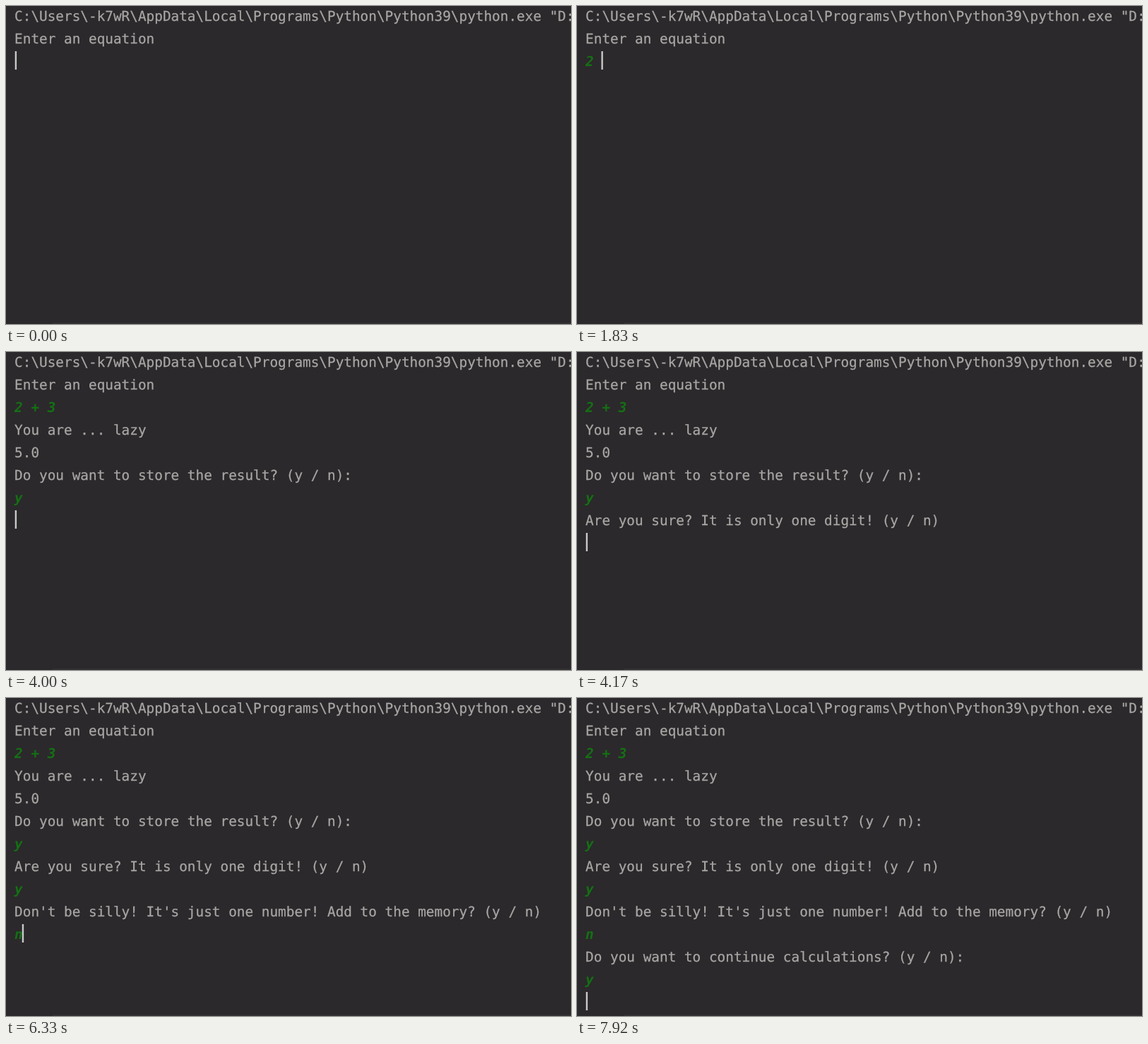
Animation, 800 px wide and 450 px high, one loop 8000 ms. Source, as an HTML page:

```html
<!DOCTYPE html>
<html lang="en">
<head>
<meta charset="utf-8">
<title>Terminal calculator</title>
<style>
  html, body { margin: 0; width: 800px; height: 450px; overflow: hidden; background: #2b292b; }
  svg { display: block; }
  text {
    font: 19.37px "DejaVu Sans Mono", "Noto Sans Mono", monospace;
    fill: #a8a7a5;
    stroke: #a8a7a5;
    stroke-width: 0.25px;
    white-space: pre;
    text-rendering: geometricPrecision;
  }
  .input { font-style: italic; font-weight: bold; fill: #147014; stroke: none; }
</style>
</head>
<body>
<svg id="stage" width="800" height="450" viewBox="0 0 800 450">
  <rect width="800" height="450" fill="#2b292b"/>
  <rect x="66" y="448" width="734" height="2" fill="#333133"/>
  <g id="lines"></g>
  <rect id="caret" width="2.4" height="26" fill="#c9c8c8"/>
</svg>
<script>
const LOOP = 8000, LEFT = 12.1, BASE = 20.5, CELL = 11.66, ROW = 32;

// Printed lines: time, row, text
const output = [
  [0, 0, String.raw`C:\Users\-k7wR\AppData\Local\Programs\Python\Python39\python.exe "D:`],
  [0, 1, "Enter an equation"],
  [2580, 3, "You are ... lazy"],
  [2580, 4, "5.0"],
  [2580, 5, "Do you want to store the result? (y / n):"],
  [4170, 7, "Are you sure? It is only one digit! (y / n)"],
  [5420, 9, "Don't be silly! It's just one number! Add to the memory? (y / n)"],
  [6670, 11, "Do you want to continue calculations? (y / n):"]
];

// Typed lines: row, text, time of each key
const input = [
  [2, "2 + 3", [1500, 1830, 2000, 2170, 2330]],
  [6, "y", [3750]],
  [8, "y", [5000]],
  [10, "n", [6330]],
  [12, "y", [7670]]
];

// Caret row changes: time, row
const moves = [[0, 2], [2580, 6], [4000, 7], [4170, 8], [5250, 9], [5420, 10], [6670, 12], [7920, 13]];

// Spans in which the caret is blinked off
const hidden = [[330, 830], [1330, 1500], [3330, 3750], [4830, 5000], [7330, 7670]];

const lines = document.getElementById("lines");
const caret = document.getElementById("caret");

function addLine(row, kind) {
  const el = document.createElementNS("http://www.w3.org/2000/svg", "text");
  el.setAttribute("x", LEFT);
  el.setAttribute("y", BASE + row * ROW);
  el.setAttribute("class", kind);
  lines.append(el);
  return el;
}

function setText(el, text) {
  if (el.textContent !== text) el.textContent = text;
}

const printed = output.map(([at, row, text]) => ({ at, text, el: addLine(row, "output") }));
const typed = input.map(([row, text, keys]) => ({ row, text, keys, el: addLine(row, "input") }));

function draw(t) {
  for (const p of printed) setText(p.el, t >= p.at ? p.text : "");

  const caretRow = moves.filter(([at]) => t >= at).pop()[1];
  let col = 0;
  for (const line of typed) {
    const count = line.keys.filter(at => t >= at).length;
    setText(line.el, line.text.slice(0, count));
    if (line.row === caretRow) col = count;
  }

  const off = hidden.some(([from, to]) => t >= from && t < to);
  caret.setAttribute("x", Math.max(12.7, LEFT - 1 + col * CELL));
  caret.setAttribute("y", caretRow * ROW);
  caret.setAttribute("visibility", off ? "hidden" : "visible");
}

const start = performance.now();
function tick(now) {
  draw(Math.max(0, now - start) % LOOP);
  requestAnimationFrame(tick);
}
draw(0);
requestAnimationFrame(tick);
</script>
</body>
</html>
```
